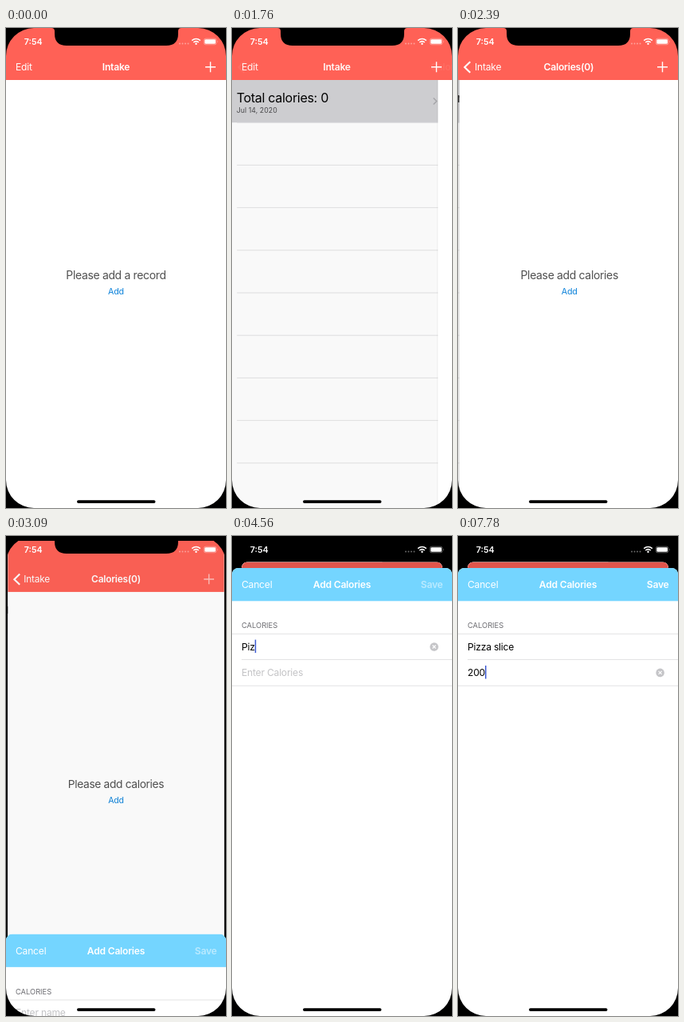
An HTML page for the animation above (8 s loop, 276 by 600 pixels).

```html
<!DOCTYPE html>
<html lang="en">
<head>
<meta charset="utf-8">
<title>Calorie log</title>
<style>
  html, body { margin: 0; height: 100%; overflow: hidden; background: #000; }
  svg { display: block; width: 100vw; height: 100vh; }
  text { font: 12.1px Inter, Roboto, sans-serif; letter-spacing: -.018em; white-space: pre; }
  .bold { font-weight: 600; }
  .mid { text-anchor: middle; }
  .white { fill: #fff; }
  .big { font-size: 14px; letter-spacing: -.025em; fill: #505050; }
  .link { font-size: 10.7px; fill: #0c82da; }
  .total { font-size: 16px; }
  .date { font-size: 8.7px; letter-spacing: .01em; fill: #48484a; }
  .head { font-size: 9.3px; letter-spacing: 0; fill: #6d6d72; }
  .clock { font-size: 10.7px; letter-spacing: 0; }
  .hint { fill: #c4c4c6; }
  .line { stroke: #dcdcde; stroke-width: .8; fill: none; }
  .icon { fill: none; stroke: #fff; }
</style>
</head>
<body>
<svg viewBox="0 0 276 600" preserveAspectRatio="none">
  <defs>
    <clipPath id="card"><rect width="276" height="640" rx="8"/></clipPath>
    <g id="clear">
      <circle r="5.3" fill="#c5c5c8"/>
      <path d="M-2-2L2 2M2-2L-2 2" stroke="#fff" stroke-width="1.1"/>
    </g>
  </defs>
  <rect width="276" height="600"/>

  <g id="back" clip-path="url(#card)">
    <rect width="276" height="600" fill="#fff"/>
    <g id="empty">
      <text class="big mid" x="138" y="314.3">Please add a record</text>
      <text class="link mid" x="138" y="333">Add</text>
    </g>
    <g id="list">
      <rect width="276" height="600" fill="#fff"/>
      <rect id="press" y="65" width="276" height="53.2" fill="#d2d2d5"/>
      <text class="total" x="11" y="92.8">Total calories: 0</text>
      <text class="date" x="11" y="105.7">Jul 14, 2020</text>
      <path d="M258 87.5l4 4-4 4" fill="none" stroke="#a8a8ac" stroke-width="1.4"/>
      <path id="rules" class="line"/>
      <rect id="listDim" width="276" height="600"/>
    </g>
    <g id="detail">
      <rect x="-1" width="1" height="600" opacity=".06"/>
      <rect width="276" height="600" fill="#fff"/>
      <text class="big mid" x="138" y="314.3">Please add calories</text>
      <text class="link mid" x="138" y="333">Add</text>
    </g>
    <rect width="276" height="65" fill="#ff6156"/>
    <text id="edit" class="white" x="12" y="53.3">Edit</text>
    <path id="chevron" class="icon" d="M15.3 42.3L8.3 49l7 6.7" stroke-width="2.1"/>
    <text id="title" class="white bold mid" y="53.3">Intake</text>
    <text id="backLabel" class="white mid" y="53.3">Intake</text>
    <text id="detailTitle" class="white bold mid" y="53.3">Calories(0)</text>
    <path id="plus" class="icon" d="M250 48.8h13M256.5 42.3v13" stroke-width="1.4"/>
    <rect id="backDim" width="276" height="600"/>
  </g>

  <g id="sheet">
    <g clip-path="url(#card)">
      <rect width="276" height="640" fill="#fff"/>
      <rect width="276" height="41.3" fill="#74d5ff"/>
    </g>
    <text class="white" x="12" y="25.2">Cancel</text>
    <text class="white bold mid" x="138" y="25.2">Add Calories</text>
    <text id="save" class="white bold" x="264.5" y="25.2" text-anchor="end">Save</text>
    <text class="head" x="12" y="75">CALORIES</text>
    <path class="line" d="M0 82.4H276M12 114.5H276M0 147.2H276"/>
    <text id="name" x="12" y="102.5"></text>
    <text id="amount" x="12" y="135"></text>
    <use id="clearIcon" href="#clear"/>
    <rect id="caret" width="1.5" height="16.5" fill="#3c5ad2"/>
  </g>

  <path fill-rule="evenodd" d="M0 0H276V600H0ZM35 0A35 35 0 0 0 0 35V565A35 35 0 0 0 35 600H241A35 35 0 0 0 276 565V35A35 35 0 0 0 241 0Z"/>
  <path d="M57 0q4 0 4 4v3q0 15 15 15H201q15 0 15-15V4q0-4 4-4z"/>
  <text class="white bold clock" x="22.7" y="20.8">7:54</text>
  <path d="M218 19.5h12" stroke="#fff" stroke-opacity=".4" stroke-width="2" stroke-linecap="round" stroke-dasharray="0 3.5"/>
  <path class="icon" d="M233.2 15.7q5.3-4.4 10.6 0M235.2 18q3.3-2.7 6.6 0" stroke-width="1.6"/>
  <circle cx="238.5" cy="19.7" r="1.2" fill="#fff"/>
  <rect class="icon" x="248.3" y="13.2" width="15.6" height="7.6" rx="2.2" stroke-width=".7" stroke-opacity=".5"/>
  <rect x="249.3" y="14.2" width="13.6" height="5.6" rx="1.3" fill="#fff"/>
  <path d="M265 15.7q1.2 1.3 0 2.6z" fill="#fff" opacity=".5"/>
  <rect x="89" y="590.2" width="98.5" height="3.8" rx="1.9"/>
</svg>
<script>
const LOOP = 8000, STEP = 70;
const TITLE_X = 138, BACK_X = 37, SHEET_TOP = 40;
const nameKeys = [4210, 4420, 4560, 4770, 4980, 5330, 5540, 5680, 5960, 6170, 6380];
const amountKeys = [7360, 7570, 7780];

const $ = id => document.getElementById(id);
const set = (id, attrs) => {
  for (const key in attrs) $(id).setAttribute(key, attrs[key]);
};
const fade = (id, opacity) => set(id, { opacity });
const clamp = x => Math.min(1, Math.max(0, x));
const smooth = x => x * x * (3 - 2 * x);
const typed = (text, keys, t) => text.slice(0, keys.filter(k => k <= t).length);

// Critically damped spring from 0 to 1; rate is per second.
const spring = (t, start, rate) => {
  const x = Math.max(0, t - start) / 1000 * rate;
  return 1 - (1 + x) * Math.exp(-x);
};

const fill = (id, text, hint) => {
  $(id).textContent = text || hint;
  $(id).setAttribute('class', text ? '' : 'hint');
};

let rules = '';
for (let i = 0; i < 9; i++) rules += `M11.5 ${118.2 + i * 53.2}H276`;
set('rules', { d: rules });

function drawBack(t) {
  const insert = smooth(clamp((t - 570) / 560));
  const push = spring(t, 1722, 10.75);
  const lift = spring(t, 3048, 18.5);

  fade('empty', 1 - insert);
  set('list', { opacity: insert, transform: `translate(${-82.8 * push})` });
  fade('press', t >= 1620 ? 1 : 0);
  fade('listDim', .1 * Math.sqrt(push));
  set('detail', { transform: `translate(${276 * (1 - push) + (push ? 0 : 2)})` });

  const labelX = TITLE_X + (BACK_X - TITLE_X) * push;
  set('title', { x: labelX, opacity: 1 - push });
  set('backLabel', { x: labelX, opacity: push });
  set('detailTitle', { x: TITLE_X + 152 * (1 - push), opacity: push });
  fade('edit', 1 - push);
  fade('chevron', push);
  fade('plus', t >= 2950 ? .6 : t >= 500 ? .35 + .65 * insert : 1);

  set('back', {
    transform: `translate(${12 * lift} ${32.5 * lift}) scale(${1 - 24 * lift / 276})`
  });
  fade('backDim', .12 * lift);
  set('sheet', { transform: `translate(0 ${600 + (SHEET_TOP - 600) * lift})` });
}

function drawForm(t) {
  const name = typed('Pizza slice', nameKeys, t);
  const amount = typed('200', amountKeys, t);
  fill('name', name, 'Enter name');
  fill('amount', amount, 'Enter Calories');

  const second = t >= 6800;
  const field = second ? 'amount' : 'name';
  const value = second ? amount : name;
  const rowY = second ? 130.7 : 98.3;
  const width = value ? $(field).getComputedTextLength() : 0;
  set('caret', { x: 12 + width, y: rowY - 8.7, opacity: t >= 4070 ? 1 : 0 });
  set('clearIcon', { transform: `translate(253.6 ${rowY + .2})`, opacity: value ? 1 : 0 });
  fade('save', amount ? 1 : .5);
}

function frame(now) {
  const t = Math.max(0, Math.floor((now % LOOP - 10) / STEP) * STEP + 10);
  drawBack(t);
  drawForm(t);
  requestAnimationFrame(frame);
}
frame(0);
</script>
</body>
</html>
```
